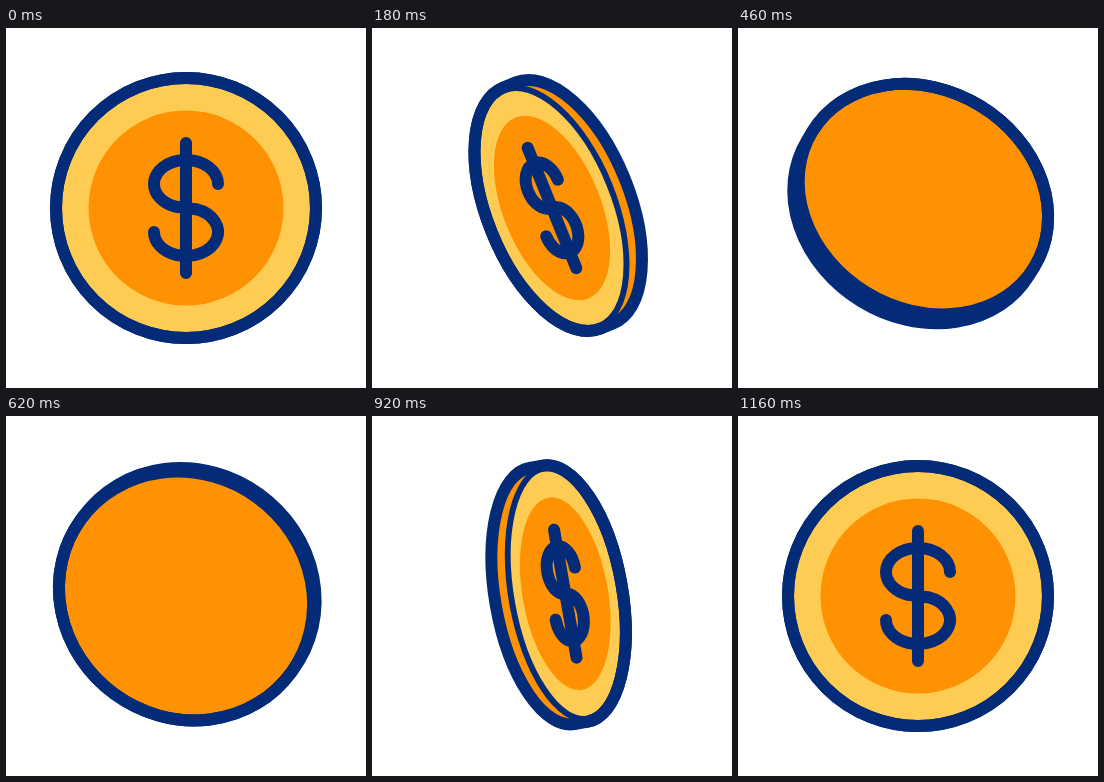
These frames come from a looping animation (360 px wide and 360 px high, 1.4 s). An HTML page with a canvas:

```html
<!DOCTYPE html>
<html lang="en">
<head>
<meta charset="utf-8">
<title>Flipping coin</title>
<style>
  html, body { margin: 0; width: 100%; height: 100%; overflow: hidden; background: #fff; }
  canvas { display: block; width: 360px; height: 360px; }
</style>
</head>
<body>
<canvas id="stage" width="360" height="360"></canvas>
<script>
const ctx = document.getElementById('stage').getContext('2d');
const NAVY = '#032b77', YELLOW = '#ffcc53', ORANGE = '#ff9202';
const LOOP = 1400, STEP = 20, SPIN_END = 1160, RADIUS = 130;
const { PI, sin, cos, abs, min, floor } = Math;
const rad = deg => deg * PI / 180;

// time in ms, flip angle, direction of the tilt, thickness
const KEYS = [
  [0, 0, 0, 11],
  [180, 60, 22, 15.5],
  [340, 107, 50, 25],
  [480, 154, 59, 18],
  [620, 201, 54, 12],
  [780, 253.5, 33, 25.5],
  [920, 296, 10, 15],
  [1160, 360, 0, 11]
];

// Smooth curve through the keys, with tangents from the neighbours
function sample(t, col) {
  let i = 0;
  while (i < KEYS.length - 2 && t >= KEYS[i + 1][0]) i++;
  const slope = n => {
    const a = KEYS[Math.max(n - 1, 0)], b = KEYS[min(n + 1, KEYS.length - 1)];
    return (b[col] - a[col]) / (b[0] - a[0]);
  };
  const a = KEYS[i], b = KEYS[i + 1], span = b[0] - a[0];
  const u = (t - a[0]) / span, v = 1 - u;
  return a[col] * v * v * (1 + 2 * u) + b[col] * u * u * (1 + 2 * v)
    + span * u * v * (slope(i) * v - slope(i + 1) * u);
}

function disc(x, squash, radius) {
  const path = new Path2D();
  path.ellipse(x, 0, radius * squash, radius, 0, 0, 2 * PI);
  return path;
}

// Silhouette of the two discs and the rim between them
function coinHull(depth, squash) {
  const path = new Path2D();
  path.ellipse(0, 0, RADIUS * squash, RADIUS, 0, PI / 2, PI * 1.5);
  path.ellipse(depth, 0, RADIUS * squash, RADIUS, 0, -PI / 2, PI / 2);
  path.closePath();
  return path;
}

function dollar(x, squash) {
  const path = new Path2D(), w = 32 * squash;
  path.moveTo(x, -65);
  path.lineTo(x, 65);
  path.moveTo(x + w, -25);
  path.ellipse(x, -24, w, 24, 0, 0, PI * 0.6, true);
  path.ellipse(x, 24, w, 24, 0, -PI * 0.4, PI);
  return path;
}

function fill(path, color, rule = 'nonzero') {
  ctx.fillStyle = color;
  ctx.fill(path, rule);
}

function draw(t) {
  const flip = rad(sample(t, 1));
  const squash = abs(cos(flip));
  const depth = abs(sin(flip)) * sample(t, 3);
  const isFront = cos(flip) > 0;
  const faceX = sin(2 * flip) < 0 ? depth : 0;
  const hull = coinHull(depth, squash);
  const face = disc(faceX, squash, RADIUS);

  ctx.setTransform(1, 0, 0, 1, 0, 0);
  ctx.clearRect(0, 0, 360, 360);
  ctx.translate(180, 180);
  ctx.rotate(-rad(sample(t, 2)));
  ctx.strokeStyle = NAVY;
  ctx.lineWidth = 12;
  ctx.lineCap = ctx.lineJoin = 'round';

  fill(hull, ORANGE);
  if (isFront) {
    fill(face, YELLOW);
    fill(disc(faceX, squash, 97.5), ORANGE);
    ctx.stroke(dollar(faceX, squash));
  }
  ctx.stroke(face);
  if (isFront) {
    // The rim covers the outer half of the face line
    const rim = new Path2D(hull);
    rim.addPath(face);
    fill(rim, ORANGE, 'evenodd');
  }
  ctx.stroke(hull);
}

function tick() {
  const t = floor(performance.now() % LOOP / STEP) * STEP;
  draw(min(t, SPIN_END));
  requestAnimationFrame(tick);
}
tick();
</script>
</body>
</html>
```
